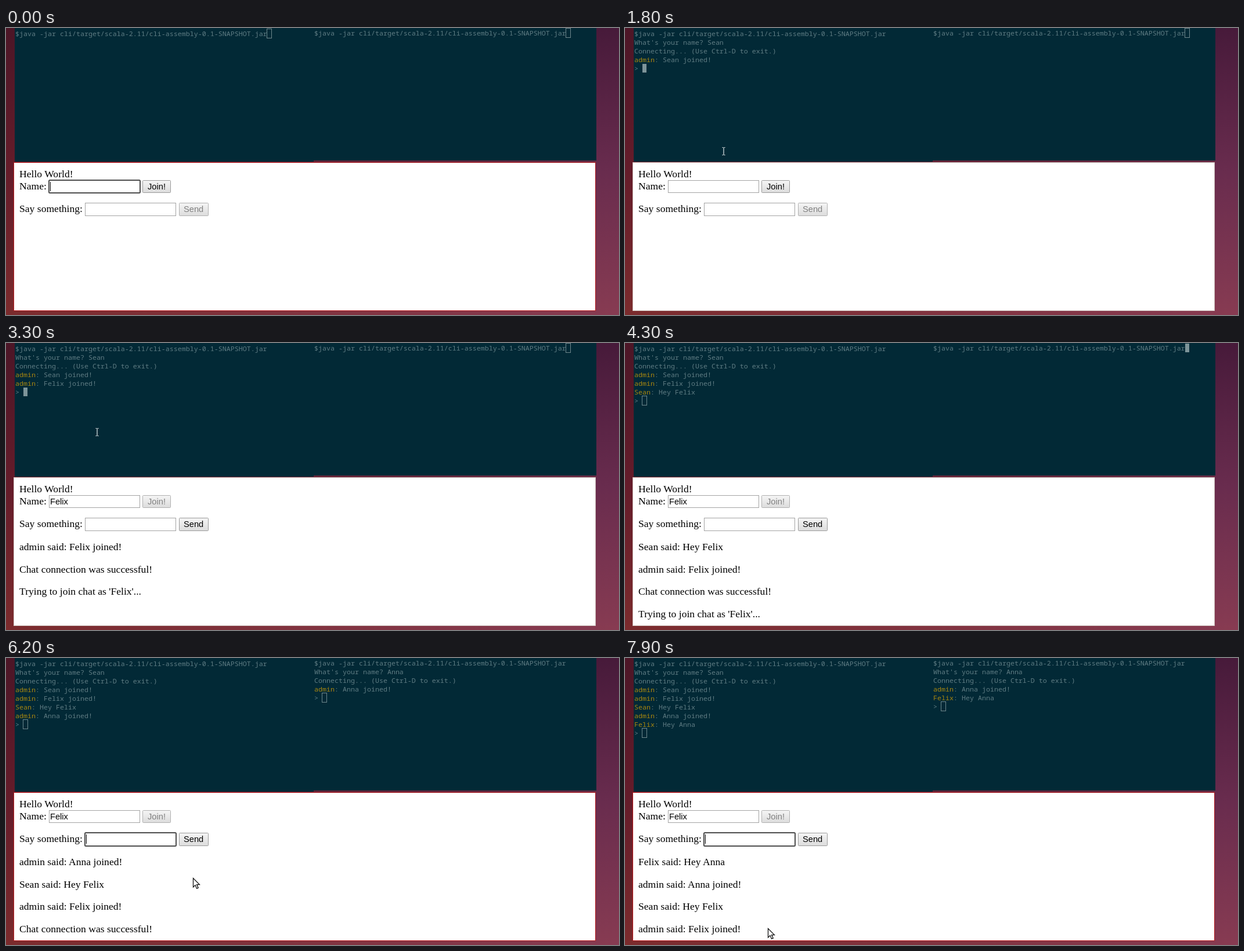
An HTML page that plays this animation: 1056 by 496 pixels, repeating every 8 s.

```html
<!DOCTYPE html>
<html lang="en">
<head>
<meta charset="utf-8">
<title>Chat demo</title>
<style>
  html, body { margin: 0; width: 100%; height: 100%; overflow: hidden; background: #6d2433; }
  svg { display: block; width: 1056px; height: 496px; }
  text { white-space: pre; }
  .term { font: 11.667px "Noto Sans Mono", monospace; fill: #5f7c83; }
  .nick { fill: #a88710; }
  .page { font: 17.6px "Liberation Serif", serif; fill: #000; }
  .ctl { font: 14.667px "Liberation Sans", sans-serif; fill: #000; }
  .off { fill: #808080; }
</style>
</head>
<body>
<svg viewBox="0 0 1056 496">
  <defs>
    <linearGradient id="left" x2="0" y2="1">
      <stop stop-color="#4c1627"/><stop offset=".5" stop-color="#651c2a"/><stop offset="1" stop-color="#7b2b2d"/>
    </linearGradient>
    <linearGradient id="right" x2="0" y2="1">
      <stop stop-color="#471a3a"/><stop offset=".5" stop-color="#692c4e"/><stop offset="1" stop-color="#873b52"/>
    </linearGradient>
    <linearGradient id="low">
      <stop stop-color="#7b2b2d"/><stop offset="1" stop-color="#873b52"/>
    </linearGradient>
    <linearGradient id="gap">
      <stop stop-color="#651d2b"/><stop offset="1" stop-color="#692c46"/>
    </linearGradient>
    <linearGradient id="button" x2="0" y2="1">
      <stop stop-color="#f5f5f5"/><stop offset="1" stop-color="#dcdcdc"/>
    </linearGradient>
    <clipPath id="view"><rect x="14" y="233" width="1001" height="255"/></clipPath>
  </defs>
  <rect width="15" height="496" fill="url(#left)"/>
  <rect x="1015" width="41" height="496" fill="url(#right)"/>
  <rect y="488" width="1056" height="8" fill="url(#low)"/>
  <rect x="14" y="229" width="1003" height="4" fill="url(#gap)"/>
  <path d="M15 0H1017V229H530V231H15Z" fill="#022936"/>
  <g id="scene"></g>
</svg>
<script>
const LOOP = 8000, STEP = 100;
const COMMAND = "$java -jar cli/target/scala-2.11/cli-assembly-0.1-SNAPSHOT.jar";
const ASK = "What's your name? ";
const scene = document.getElementById("scene");

const terminals = [
  { x: 16, y: 14, run: 300, ask: 800, typeName: 1100, enter: 1500, name: "Sean",
    focus: [[200, 1900], [3100, 4300]], say: "Hey Felix", sayAt: 3400,
    log: [[1800, "admin", "Sean joined!"], [2900, "admin", "Felix joined!"],
          [4200, "Sean", "Hey Felix"], [5800, "admin", "Anna joined!"],
          [7200, "Felix", "Hey Anna"]] },
  { x: 531, y: 13, run: 4500, ask: 4900, typeName: 5100, enter: 5500, name: "Anna",
    focus: [[4300, 5900]], say: "", sayAt: LOOP,
    log: [[5800, "admin", "Anna joined!"], [7200, "Felix", "Hey Anna"]] }
];

const messages = [
  [2700, "Trying to join chat as 'Felix'..."],
  [2800, "Chat connection was successful!"],
  [2900, "admin said: Felix joined!"],
  [4200, "Sean said: Hey Felix"],
  [5800, "admin said: Anna joined!"],
  [7200, "Felix said: Hey Anna"]
];

// Each path holds [time, x, y] stops; the pointer hides outside of them.
const pointerPaths = [
  [[100, 150, 250], [200, 170, 160], [400, 170, 160]],
  [[1700, 190, 150], [1900, 150, 275], [2300, 150, 275], [2500, 172, 316],
   [2800, 172, 316], [3200, 157, 154], [3400, 157, 154]],
  [[5600, 330, 120], [5900, 210, 313], [6200, 322, 380], [7300, 322, 380],
   [7700, 246, 467], [LOOP, 246, 467]]
];

const within = (t, [from, to]) => t >= from && t < to;
const typed = (word, start, t) => word.slice(0, Math.max(0, Math.floor((t - start) / STEP) + 1));
const text = (x, y, cls, str) => `<text x="${x}" y="${y}" class="${cls}">${str}</text>`;
const rect = (x, y, w, h, attrs) => `<rect x="${x}" y="${y}" width="${w}" height="${h}" ${attrs}/>`;

function terminal(c, t) {
  const lines = [];
  let tail = COMMAND;
  if (t >= c.run) { lines.push(COMMAND); tail = ""; }
  if (within(t, [c.ask, c.enter])) tail = ASK + typed(c.name, c.typeName, t);
  if (t >= c.enter) lines.push(ASK + c.name);
  if (t >= c.enter + 200) lines.push("Connecting... (Use Ctrl-D to exit.)");
  for (const [at, nick, msg] of c.log)
    if (t >= at) lines.push(`<tspan class="nick">${nick}</tspan>: ${msg}`);
  if (t >= c.log[0][0])
    tail = "&gt; " + (within(t, [c.sayAt, c.sayAt + c.say.length * STEP - 1]) && t < 4200 ? typed(c.say, c.sayAt, t) : "");

  const column = tail.replace("&gt;", ">").length;
  const x = c.x + column * 7, y = c.y + lines.length * 15;
  const active = c.focus.some(span => within(t, span));
  const blink = within(t, [c.ask + 100, c.typeName]);
  let out = [...lines, tail].map((s, i) => text(c.x, c.y + i * 15, "term", s)).join("");
  if (!active) out += rect(x - .5, y - 12.5, 8, 16, 'fill="none" stroke="#70888d"');
  else if (!blink) out += rect(x, y - 12, 7, 15, 'fill="#7d9499"');
  return out;
}

function field(x, y, h, value, focused) {
  let out = focused
    ? rect(x, y, 157, h, 'rx="1.5" fill="#fff" stroke="#4c4c4c" stroke-width="2"')
    : rect(x + .5, y + .5, 156, h - 1, 'fill="#fff" stroke="#a3a3a3"');
  out += `<text x="${x + 2}" y="${y + 16}" class="ctl">${value}</text>`;
  if (focused) out += `<rect class="caret" x="${x + 2}" y="${y + 3}" width="1" height="16"/>`;
  return out;
}

function button(x, y, w, h, label, enabled, pad) {
  return rect(x + .5, y + .5, w - 1, h - 1, `rx="1" fill="url(#button)" stroke="${enabled ? "#9a9a9a" : "#b0b0b0"}"`)
    + text(x + pad, y + 16, enabled ? "ctl" : "ctl off", label);
}

function page(t) {
  const active = !terminals.some(c => c.focus.some(span => within(t, span)));
  const joined = t >= 2700, chatting = t >= 5900;
  const reply = t < 7200 ? typed("Hey Anna", 6400, t) : "";
  const shown = messages.filter(([at]) => t >= at).reverse();
  return rect(13.5, 232.5, 1002, 256, `fill="#fff" stroke="${active ? "#b81d20" : "#cfc4bf"}"`)
    + text(23, 258, "page", "Hello World!")
    + text(23, 279, "page", "Name:")
    + field(74, 263, 22, typed("Felix", 2000, t), active && !chatting)
    + button(235, 263, 49, 22, "Join!", !joined, 9)
    + text(23, 318, "page", "Say something:")
    + field(136, 302, 23, reply, active && chatting)
    + button(298, 302, 51, 23, "Send", t >= 2800, 8)
    + '<g clip-path="url(#view)">'
    + shown.map(([, msg], i) => text(23, Math.round(358 + i * 38.6), "page", msg)).join("")
    + "</g>";
}

function pointer(t) {
  const path = pointerPaths.find(p => within(t, [p[0][0], p[p.length - 1][0]]));
  if (!path) return "";
  const i = path.findIndex(p => p[0] > t);
  const [t0, x0, y0] = path[i - 1], [t1, x1, y1] = path[i];
  const k = (t - t0) / (t1 - t0);
  const x = Math.round(x0 + (x1 - x0) * k), y = Math.round(y0 + (y1 - y0) * k);
  const inTerm = y < 230;
  const inField = within(y, [263, 285]) && within(x, [74, 231]) || within(y, [302, 325]) && within(x, [136, 293]);
  const beam = 'd="M-2.5-6.5h2M.5-6.5h2M0-6V6M-2.5 6.5h2M.5 6.5h2" fill="none"';
  const shape = inTerm ? `<path ${beam} stroke="#e4eaea" stroke-width="1.2"/>`
    : inField ? `<path ${beam} stroke="#fff" stroke-width="3.5"/><path ${beam} stroke="#111" stroke-width="1.7"/>`
    : '<path d="M.5.5V16L4 12.6 6.6 18.4 9.2 17.2 6.6 11.6H11.4Z" fill="#fff" stroke="#111" stroke-width="1.3"/>';
  return `<g transform="translate(${x} ${y})">${shape}</g>`;
}

function placeCaret() {
  const caret = scene.querySelector(".caret");
  if (!caret) return;
  const label = caret.previousElementSibling;
  const width = label.textContent ? label.getComputedTextLength() : 0;
  caret.setAttribute("x", Math.round(+label.getAttribute("x") + width));
}

let last = -1;
function frame() {
  const t = Math.floor(performance.now() % LOOP / STEP) * STEP;
  if (t !== last) {
    last = t;
    scene.innerHTML = terminals.map(c => terminal(c, t)).join("") + page(t) + pointer(t);
    placeCaret();
  }
  requestAnimationFrame(frame);
}
frame();
</script>
</body>
</html>
```
